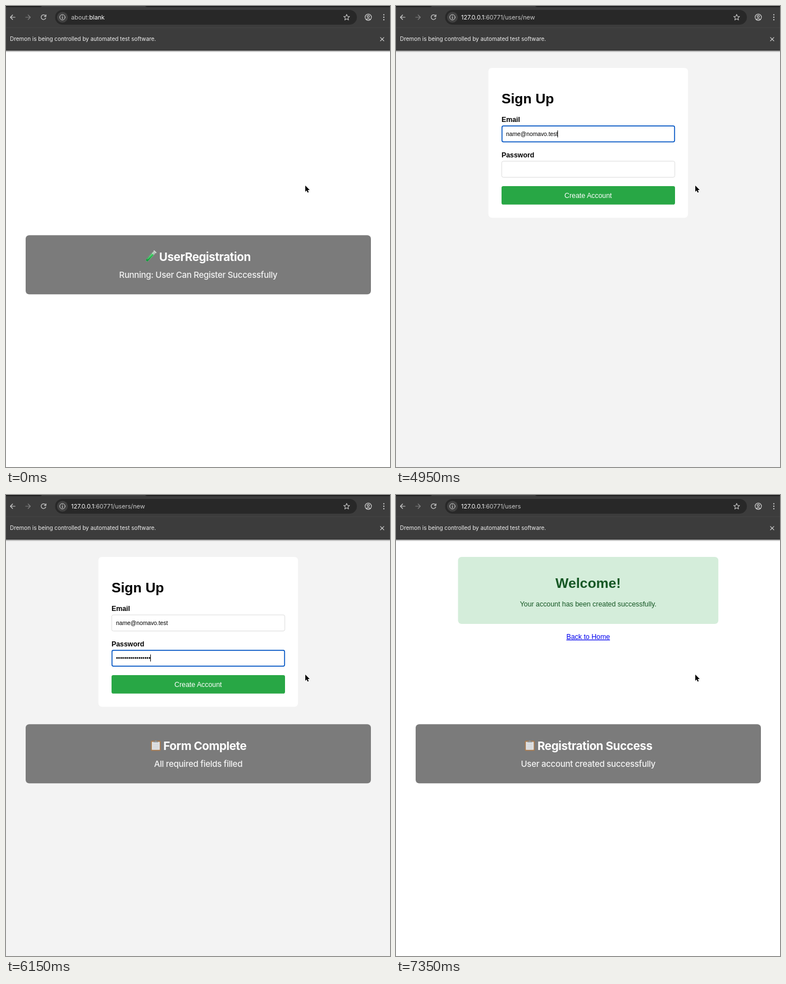
An HTML page for the animation above (8.4 s loop, 684 by 819 pixels).

```html
<!DOCTYPE html>
<html lang="en">
<head>
<meta charset="utf-8">
<title>Sign-up walkthrough</title>
<style>
  html, body { margin: 0; width: 100%; height: 100%; overflow: hidden; background: #fff; }
  svg { display: block; width: 100%; height: 100%; }
  text { font: 12.37px "Liberation Sans", Arial, sans-serif; white-space: pre; }
  .ui text, .banner text { font-family: Inter, sans-serif; font-optical-sizing: none; }
  .ui .address { font-size: 10.8px; fill: #c9c9c9; }
  .ui .note { font-size: 9.95px; fill: #f0f0f0; }
  .address tspan { fill: #fff; }
  .line { fill: none; stroke: #cfcfcf; stroke-width: 1.2; stroke-linecap: round; stroke-linejoin: round; }
  .heading { font-size: 24.74px; font-weight: 700; }
  .label { font-weight: 700; }
  .value { font-size: 10.31px; }
  .mid, .banner text { text-anchor: middle; }
  .field { fill: #fff; stroke: #d9d9d9; stroke-width: .9; }
  .focus { fill: none; stroke: #0c5cc7; stroke-width: 1.7; }
  .banner .title { font-size: 20.6px; font-weight: 700; letter-spacing: -.4px; fill: #fff; }
  .banner .detail { font-size: 15px; font-weight: 500; letter-spacing: -.28px; fill: #f3f3f3; }
</style>
</head>
<body>
<svg viewBox="0 0 684 819" preserveAspectRatio="none">
  <defs>
    <linearGradient id="shade" x2="0" y2="1">
      <stop stop-opacity=".42"/>
      <stop offset="1" stop-opacity="0"/>
    </linearGradient>
    <linearGradient id="liquid" x2="0" y2="1">
      <stop stop-color="#35c958"/>
      <stop offset="1" stop-color="#12923a"/>
    </linearGradient>
    <g id="tube" transform="translate(10 10) rotate(43)">
      <rect x="-2.5" y="-11" width="5" height="23" rx="2.5" fill="#aebdb4"/>
      <path d="M-2.3-5h4.6V9.4a2.3 2.3 0 0 1-4.6 0z" fill="url(#liquid)"/>
      <path d="M-.9-9V8" stroke="#d8f5df" stroke-width=".8" opacity=".75"/>
      <rect x="-3.3" y="-11.8" width="6.6" height="1.8" rx=".9" fill="#d3d9d5"/>
    </g>
    <g id="clipboard">
      <rect x="1" y="2" width="17.6" height="18" rx="1.6" fill="#a87b50"/>
      <rect x="2.8" y="4" width="14" height="14.2" fill="#e2e3e5"/>
      <path d="M4.8 8h10M4.8 10.5h10M4.8 13h10M4.8 15.5h10" stroke="#c5c7ca" stroke-width=".7"/>
      <path d="M5.5 5V3.2h2.4a2 2 0 0 1 3.8 0h2.4V5z" fill="#8e959a"/>
    </g>
  </defs>

  <rect width="684" height="819" fill="#fff"/>

  <g data-show="2550-3750">
    <text class="heading" x="110.5" y="132.7">Welcome to Sample App</text>
    <text x="110.5" y="166.3">This is a simple app for testing capybara-demo gem.</text>
    <text x="110.5" y="192.8" fill="#06c">Sign Up</text>
  </g>

  <g data-show="3750-6600">
    <rect y="79" width="684" height="740" fill="#f3f3f3"/>
    <rect x="164.6" y="109.9" width="355.5" height="266.3" rx="6.2" fill="#fff"/>
    <text class="heading" x="188" y="172.5">Sign Up</text>
    <text class="label" x="188" y="206.2">Email</text>
    <rect class="field" x="188.3" y="213" width="308.4" height="28.6" rx="3"/>
    <text class="label" x="188" y="268.9">Password</text>
    <rect class="field" x="188.3" y="275.7" width="308.4" height="28.6" rx="3"/>
    <rect x="188" y="320" width="309" height="32.8" rx="3.1" fill="#28a745"/>
    <rect data-show="6450-6600" x="188" y="320" width="309" height="32.8" rx="3.1" fill="#218838"/>
    <text class="mid" x="342.3" y="340.5" fill="#fff">Create Account</text>

    <rect class="focus" data-show="4800-5100" x="188.8" y="213.2" width="307.4" height="28.2" rx="2.6"/>
    <rect data-show="4800-4950" x="196" y="221" width="1" height="12.5"/>
    <rect data-show="4950-5100" x="287.4" y="221" width="1" height="12.5"/>
    <text class="value" data-show="4950-6600" x="196" y="230.7">name@nomavo.test</text>

    <rect class="focus" data-show="5100-6450" x="188.8" y="275.9" width="307.4" height="28.2" rx="2.6"/>
    <text class="value" data-show="5100-6600" x="196" y="293.4" id="password"></text>
    <rect data-show="5100-5700 6150-6450" x="257" y="283.3" width="1" height="12.5"/>
  </g>

  <g data-show="6600-8400">
    <rect x="110.5" y="109.9" width="463.7" height="119.2" rx="6.2" fill="#d4edda"/>
    <text class="heading mid" x="342.3" y="164.7" fill="#155724">Welcome!</text>
    <text class="mid" x="342.3" y="198.4" fill="#155724">Your account has been created successfully.</text>
    <text class="mid" x="342.3" y="255.9" fill="#00e" text-decoration="underline">Back to Home</text>
  </g>

  <g class="banner" data-show="0-2550 5100-6600 7350-8400">
    <rect x="35" y="407.2" width="615" height="105" rx="6.2" fill="#7b7b7b"/>
    <g data-show="0-2550">
      <use href="#tube" x="248" y="434.5"/>
      <text class="title" x="354.3" y="452.8">UserRegistration</text>
      <text class="detail" x="342.4" y="483.4">Running: User Can Register Successfully</text>
    </g>
    <g data-show="5100-6600">
      <use href="#clipboard" x="257" y="434.5"/>
      <text class="title" x="354.3" y="452.8">Form Complete</text>
      <text class="detail" x="342.4" y="483.4">All required fields filled</text>
    </g>
    <g data-show="7350-8400">
      <use href="#clipboard" x="228.5" y="434.5"/>
      <text class="title" x="354.3" y="452.8">Registration Success</text>
      <text class="detail" x="342.4" y="483.4">User account created successfully</text>
    </g>
  </g>

  <g class="ui">
    <rect y="79" width="684" height="3.5" fill="url(#shade)"/>
    <rect width="684" height="79" fill="#3c3c3c"/>
    <path d="M0 0H64Q63 2 60 2H0zM248 0H684V2H252Q249 2 248 0z" fill="#1f1f1f"/>
    <path d="M0 38.5H684" stroke="#464646" stroke-width=".8"/>
    <path d="M0 78.7H684" stroke="#303030" stroke-width=".8"/>
    <rect x="87.5" y="7" width="537.5" height="26.2" rx="13.1" fill="#282828"/>

    <path class="line" d="M16.2 20H7.8M11.8 16 7.8 20l4 4"/>
    <path class="line" d="M35 20h8.4M39.4 16l4 4-4 4" style="stroke:#808080"/>
    <path class="line" data-show="0-6450 6600-8400" d="M70.8 21.3A4.2 4.2 0 1 1 70 17M71.2 15.6v3h-3"/>
    <path class="line" data-show="6450-6600" d="M63.9 16.6l6.8 6.8M70.7 16.6l-6.8 6.8"/>

    <circle cx="100.5" cy="20" r="9.6" fill="#414141"/>
    <circle class="line" cx="100.5" cy="20" r="4.8" style="stroke-width:1"/>
    <path class="line" d="M100.5 19.8v2.6M100.5 17.6v.1"/>
    <path class="line" d="M606.8 14.9l1.5 3.5 3.8.3-2.9 2.5.9 3.7-3.3-2-3.3 2 .9-3.7-2.9-2.5 3.8-.3z" style="stroke-width:1.05"/>
    <circle class="line" cx="645.3" cy="20" r="5.6"/>
    <circle class="line" cx="645.3" cy="18.5" r="1.9"/>
    <path class="line" d="M641.6 24q3.7-2.6 7.4 0"/>
    <g fill="#cfcfcf">
      <circle cx="673" cy="15.6" r="1.15"/>
      <circle cx="673" cy="20" r="1.15"/>
      <circle cx="673" cy="24.4" r="1.15"/>
    </g>
    <path class="line" d="M666.9 55.8l6.2 6.2M673.1 55.8l-6.2 6.2" style="stroke-width:1.1"/>

    <text class="address" x="116" y="23.8" data-show="0-2550">about:<tspan>blank</tspan></text>
    <text class="address" x="116" y="23.8" data-show="2550-8400"><tspan>127.0.0.1</tspan>:60771<tspan id="path" style="fill:inherit"></tspan></text>
    <text class="note" x="7" y="62.4">Dremon is being controlled by automated test software.</text>
  </g>

  <path d="M533.1 318.9v11.1l2.5-2.3 1.7 3.8 1.9-.8-1.7-3.8h3.5z" stroke="#fff" stroke-width="1.5" stroke-linejoin="round" paint-order="stroke"/>
</svg>
<script>
  const LOOP = 8400;
  const path = document.getElementById('path');
  document.getElementById('password').textContent = '•'.repeat(17);

  const parts = [...document.querySelectorAll('[data-show]')].map(node => ({
    node,
    spans: node.dataset.show.split(' ').map(span => span.split('-').map(Number))
  }));

  function pathAt(t) {
    if (t < 3750) return '';
    return t < 6600 ? '/users/new' : '/users';
  }

  function draw(now) {
    const t = now % LOOP;
    for (const { node, spans } of parts) {
      const visible = spans.some(([from, to]) => t >= from && t < to);
      node.style.display = visible ? '' : 'none';
    }
    path.textContent = pathAt(t);
  }

  const start = performance.now();
  function tick() {
    draw(performance.now() - start);
    requestAnimationFrame(tick);
  }
  tick();
</script>
</body>
</html>
```
